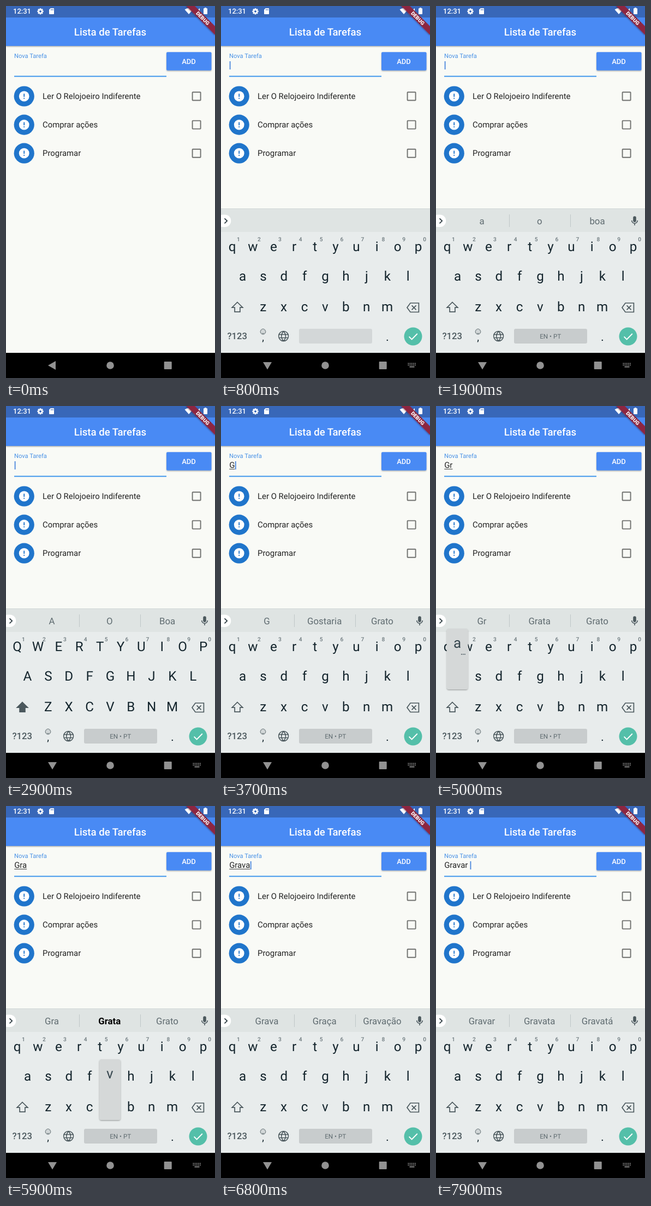
Animation, 383 px wide and 680 px high, one loop 8000 ms. Source, as an HTML page:

```html
<!DOCTYPE html>
<html lang="pt">
<head>
<meta charset="utf-8">
<title>Lista de Tarefas</title>
<style>
html, body { margin: 0; width: 100%; height: 100%; overflow: hidden; background: #f9faf6; }
svg { display: block; width: 100%; height: 100%; font-family: Roboto, sans-serif; text-rendering: geometricPrecision; }
text { white-space: pre; }
.mid { text-anchor: middle; }
.med { font-weight: 500; }
</style>
</head>
<body>
<svg id="stage" viewBox="0 0 383 680">
  <defs>
    <filter id="soft" x="-30%" y="-30%" width="160%" height="170%">
      <feDropShadow dx="0" dy="1.2" stdDeviation="1.3" flood-opacity=".35"/>
    </filter>
    <clipPath id="body"><rect width="383" height="634"/></clipPath>
  </defs>
  <rect width="383" height="680" fill="#f9faf6"/>
  <g id="app"></g>
  <g clip-path="url(#body)"><g id="board"></g></g>
  <g id="nav"></g>
  <g id="banner"></g>
</svg>
<script>
const LOOP = 8000, STEP = 37.9;
const INK = '#13242c', GREY = '#4b585d', BLUE = '#4a8af4';
const $ = id => document.getElementById(id);

const label = (x, y, size, fill, str, more = '') =>
  `<text x="${x}" y="${y}" font-size="${size}" fill="${fill}" ${more}>${str}</text>`;
const box = (x, y, w, h, fill, more = '') =>
  `<rect x="${x}" y="${y}" width="${w}" height="${h}" fill="${fill}" ${more}/>`;
const dot = (x, y, r, fill, more = '') =>
  `<circle cx="${x}" cy="${y}" r="${r}" fill="${fill}" ${more}/>`;
const shape = (d, fill, more = '') => `<path d="${d}" fill="${fill}" ${more}/>`;
const line = (d, color, w) => shape(d, 'none', `stroke="${color}" stroke-width="${w}"`);

function statusBar() {
  const teeth = Array.from({ length: 8 }, (_, i) =>
    box(-1.3, -5.7, 2.6, 3, '#fff', `transform="rotate(${i * 45})"`)).join('');
  return box(0, 0, 383, 21, '#3867b8') +
    label(13, 14.3, 13, '#fff', '12:31', 'class="med"') +
    `<g transform="translate(63 9.8)">${teeth}${dot(0, 0, 3.1, 'none', 'stroke="#fff" stroke-width="2.4"')}</g>` +
    shape('M81.7 4H87q1 0 1 1V14q0 1-1 1H80q-1 0-1-1V6.7Z', '#fff') +
    line('M82.5 5.6V8M84.4 5.6V8M86.3 5.6V8', '#3867b8', .9) +
    shape('M327.5 6.6Q335 .8 342.5 6.6L335 15Z', '#fff') +
    shape('M344 15L355 4V15Z', '#fff') +
    shape('M364 4.2V3H367V4.2H368.2Q369 4.2 369 5V14.2Q369 15 368.2 15H362.8Q362 15 362 14.2V5Q362 4.2 362.8 4.2Z', '#fff');
}

function taskRow(name, i) {
  const y = 165 + i * 52.1;
  return dot(33.2, y, 18.6, '#2075cb') + dot(33.2, y, 9.4, '#fff') +
    box(32.25, y - 4.7, 1.9, 5.7, '#2075cb') + box(32.25, y + 2.8, 1.9, 1.9, '#2075cb') +
    label(67, y + 5.2, 14.9, '#222', name) +
    box(341.6, y - 7.5, 15, 15, 'none', 'rx=".8" stroke="#70716f" stroke-width="1.9"');
}

function buildApp() {
  const tasks = ['Ler O Relojoeiro Indiferente', 'Comprar ações', 'Programar'];
  $('app').innerHTML =
    box(0, 20, 383, 53, BLUE, 'filter="url(#soft)"') + statusBar() +
    label(191, 53.5, 18.6, '#fff', 'Lista de Tarefas', 'class="mid med"') +
    label(15, 95.3, 11.17, '#4a92e6', 'Nova Tarefa') +
    box(15, 127.6, 279, 1.9, '#3893ec') +
    box(294, 84.3, 82.5, 33.5, BLUE, 'rx="2" filter="url(#soft)"') +
    label(335, 105.7, 13, '#fff', 'ADD', 'class="mid med"') +
    tasks.map(taskRow).join('') +
    '<text id="typed" x="15.2" y="113.4" font-size="14.9" fill="#222"></text>' +
    '<rect id="under" x="15.2" y="114.8" height="1" fill="#333"/>' +
    '<rect id="caret" y="101" width="1.8" height="15" fill="#4a86dc"/>';
  $('banner').innerHTML = `<g transform="translate(383 0) rotate(45)">` +
    box(-37.2, 26.1, 74.4, 11.2, '#8d2741', 'filter="url(#soft)"') +
    label(0, 35, 9.5, '#fff', 'DEBUG', 'class="mid" font-weight="900"') + '</g>';
}

const rows = [['qwertyuiop', 20.5, 440], ['asdfghjkl', 39.5, 494], ['zxcvbnm', 77.2, 550]];
const keys = {};
rows.forEach(([chars, x0, y]) => [...chars].forEach((c, i) => keys[c] = { x: x0 + i * STEP, y }));

function buildBoard() {
  const mid = 'class="mid"';
  const letters = Object.entries(keys).map(([c, k]) =>
    label(k.x, k.y + 7.8, 24.2, INK, c, 'class="mid key"')).join('');
  const digits = [...'1234567890'].map((c, i) =>
    label(32 + i * STEP, 430, 10.2, '#6c787d', c, 'class="mid med"')).join('');
  $('board').innerHTML =
    box(0, 370.5, 383, 264, '#e8ecec') + box(0, 370.5, 383, 42.5, '#dfe4e3') +
    box(0, 370, 383, 1, '#d3d8d7') +
    box(-8, 381.5, 26.3, 22.5, '#fff', 'rx="11.2"') + line('M6.5 388.3L11.2 392.8L6.5 397.3', '#2c3a40', 1.7) +
    '<g id="strip">' + line('M134.5 381V404M246.5 381V404', '#bfc6c7', 1) +
    [84, 189.7, 295.5].map(x => label(x, 398.8, 16.8, '#5f6b70', '', 'class="mid hint"')).join('') +
    shape('M361.2 387a2.8 2.8 0 0 1 5.6 0v5.2a2.8 2.8 0 0 1-5.6 0Z', GREY) +
    line('M358.7 392a5.3 5.3 0 0 0 10.6 0M364 397.5V401', GREY, 1.6) + '</g>' +
    box(4, 528.5, 52, 43.5, '#d3d9d9', 'id="shiftHit" rx="8"') +
    digits + letters +
    shape('M30 541.5L39.8 551.2H34.9V559.2H25.1V551.2H20.2Z', 'none', `id="shift" stroke="${GREY}" stroke-width="1.7"`) +
    line('M347 543H362.4V559.5H347L341 551.2ZM349.6 547.3L357.6 555.3M357.6 547.3L349.6 555.3', GREY, 1.7) +
    label(29.7, 609.3, 16.6, GREY, '?123', 'class="mid med"') +
    dot(77, 595.3, 4.8, 'none', `stroke="${GREY}" stroke-width="1"`) +
    dot(75.3, 594, .8, GREY) + dot(78.7, 594, .8, GREY) + line('M74.4 596.7Q77 600 79.6 596.7', GREY, 1) +
    label(77, 611.5, 19, INK, ',', mid) +
    line('M105.6 603.5a9 9 0 1 0 18 0a9 9 0 1 0-18 0M106.4 600.4H122.8M106.4 606.6H122.8' +
      'M114.6 594.5Q106.8 603.5 114.6 612.5Q122.4 603.5 114.6 594.5', GREY, 1.5) +
    box(143, 590, 134, 27, '#c8cccd', 'id="space" rx="3"') +
    label(209.7, 607.7, 11.7, '#5f6b70', 'EN • PT', 'id="lang" class="mid"') +
    label(305, 611.5, 22, INK, '.', mid) +
    dot(352, 604, 16.5, '#54bfa9') + line('M344.6 604.3L349.6 609.3L359.8 599', '#fff', 1.9) +
    '<g id="popup">' + box(-19.3, -87, 38.8, 111, '#d5d8d8', 'rx="4" filter="url(#soft)"') +
    label(0, -52, 26, '#37474f', '', 'id="popChar" class="mid"') +
    '<g id="popDots">' + [7, 10, 13].map(x => box(x, -41, 1.6, 1.6, '#37474f')).join('') + '</g></g>';
}

function buildNav() {
  const c = '#929292';
  let icon = '';
  for (let r = 0; r < 2; r++)
    for (let i = 0; i < 5; i++) icon += box(342.5 + i * 3.1, 652.5 + r * 3, 1.8, 1.8, c);
  $('nav').innerHTML = box(0, 634, 383, 46, '#000') +
    shape('M77 657L91 649V665Z', c, 'id="back"') +
    shape('M77 651H93L85 664.5Z', c, 'id="down"') +
    dot(191, 657, 6.8, c) + box(289.7, 650, 14, 14, c, 'rx="1"') +
    `<g id="boardIcon">${icon}${box(345.5, 658.7, 9, 1.8, c)}</g>`;
}

// Each track lists [start time, value]; a value holds until the next entry.
const tracks = {
  text: [[0, ''], [3600, 'G'], [4500, 'Gr'], [5200, 'Gra'], [6000, 'Grav'], [6700, 'Grava'], [7300, 'Gravar'], [7800, 'Gravar ']],
  caret: [[0, 0], [300, 1], [1400, 0], [1900, 1], [2400, 0], [2900, 1], [3400, 0], [3600, 1], [4100, 0],
    [4500, 1], [5000, 0], [5200, 1], [5700, 0], [6000, 1], [6400, 0], [6700, 1]],
  lift: [[0, 0], [700, .5], [800, 1]],
  ready: [[0, 0], [1000, 1]],
  upper: [[0, 0], [2500, 1], [3700, 0]],
  shiftHit: [[0, 0], [2400, 1], [2600, 0]],
  spaceHit: [[0, 0], [7700, 1], [7900, 0]],
  popup: [[0, ''], [3500, 'G'], [3600, ''], [4400, 'r'], [4500, ''], [5000, 'a'], [5200, ''], [5900, 'v'], [6000, ''],
    [6600, 'a'], [6700, ''], [7100, 'r'], [7300, '']],
  hints: [[0, 'a o boa'], [2500, 'A O Boa'], [3600, 'G Gostaria Grato'], [4500, 'Gr Grata Grato'], [5300, 'Gra *Grata Grato'],
    [6000, 'Grav Gravar Gravado'], [6800, 'Grava Graça Gravação'], [7300, 'Gravar Gravata Gravatá']]
};
const valueAt = (track, t) => track.reduce((v, [start, next]) => t >= start ? next : v, track[0][1]);
const show = (id, on) => $(id).setAttribute('visibility', on ? 'inherit' : 'hidden');

function draw(t) {
  const s = {};
  for (const name in tracks) s[name] = valueAt(tracks[name], t);

  const typed = $('typed');
  typed.textContent = s.text;
  const width = s.text ? typed.getComputedTextLength() : 0;
  $('under').setAttribute('width', width);
  show('under', s.text && !s.text.endsWith(' '));
  $('caret').setAttribute('x', 15.7 + width);
  show('caret', s.caret);

  $('board').setAttribute('transform', `translate(0 ${(1 - s.lift) * 264})`);
  show('board', s.lift);
  show('back', !s.lift);
  show('down', s.lift);
  show('boardIcon', s.lift);
  show('strip', s.ready);
  show('lang', s.ready);
  $('space').setAttribute('fill', s.spaceHit ? '#aeb4b6' : s.ready ? '#c8cccd' : '#d3d7d8');

  const words = s.hints.split(' ');
  document.querySelectorAll('.hint').forEach((el, i) => {
    const bold = words[i][0] === '*';
    el.textContent = words[i].replace('*', '');
    el.setAttribute('font-weight', bold ? 700 : 400);
    el.setAttribute('fill', bold ? '#000' : '#5f6b70');
  });
  document.querySelectorAll('.key').forEach(el => {
    el.textContent = s.upper ? el.textContent.toUpperCase() : el.textContent.toLowerCase();
  });
  show('shiftHit', s.shiftHit);
  $('shift').setAttribute('fill', s.upper ? GREY : 'none');

  show('popup', s.popup);
  if (s.popup) {
    const k = keys[s.popup.toLowerCase()];
    $('popup').setAttribute('transform', `translate(${k.x - .5} ${k.y})`);
    $('popChar').textContent = s.popup;
  }
  show('popDots', s.popup === 'a');
}

buildApp();
buildBoard();
buildNav();
const begin = performance.now();
function tick() {
  draw((performance.now() - begin) % LOOP);
  requestAnimationFrame(tick);
}
tick();
</script>
</body>
</html>
```
